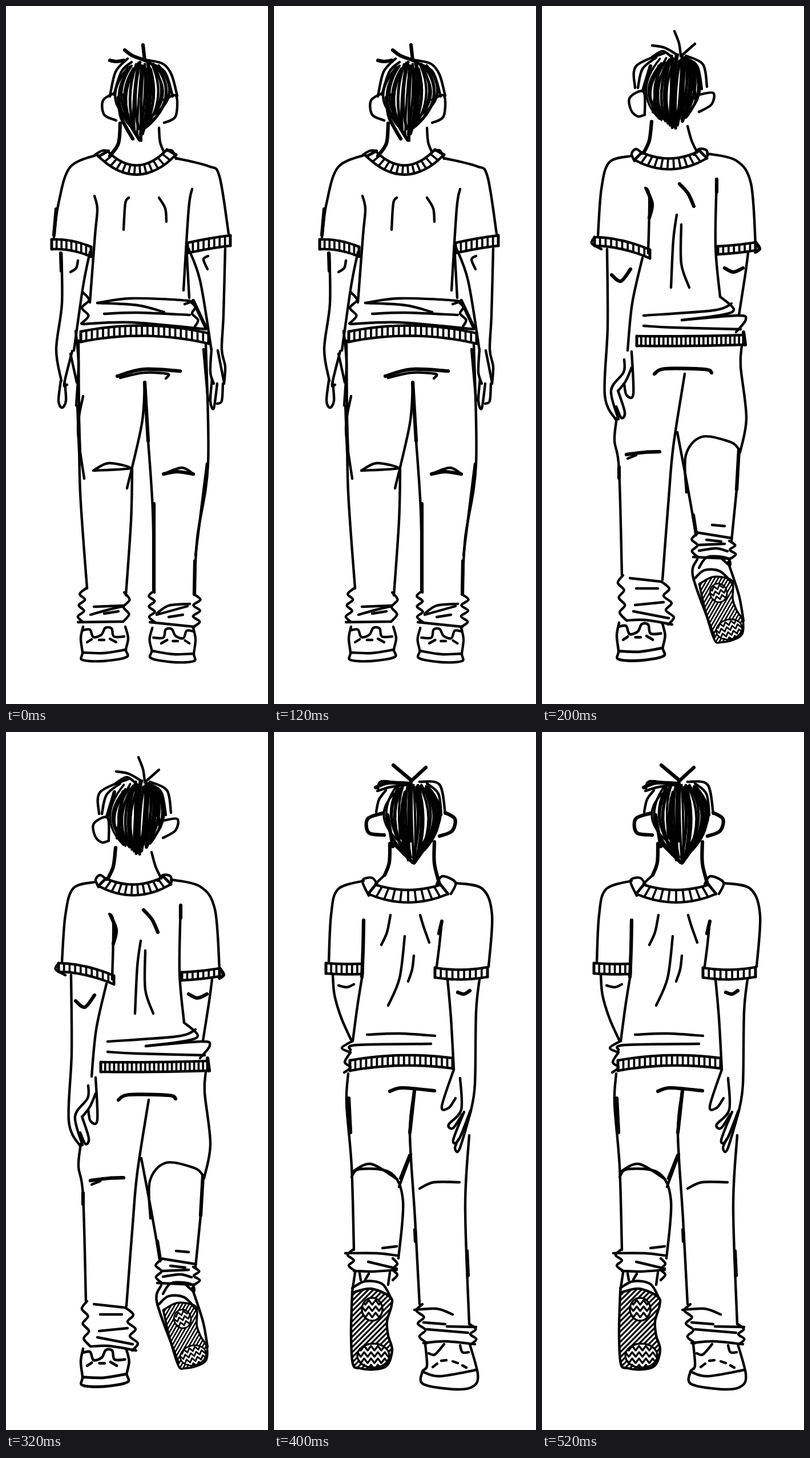
An HTML page with a canvas for the animation above (0.6 s loop, 459 by 1220 pixels).

```html
<!DOCTYPE html>
<html lang="en">
<head>
<meta charset="utf-8">
<title>Walk cycle</title>
<style>
html, body { margin: 0; width: 100%; height: 100%; overflow: hidden; background: #fff; }
canvas { display: block; }
</style>
</head>
<body>
<canvas id="stage" width="459" height="1220"></canvas>
<script>
const ctx = document.getElementById('stage').getContext('2d');
const HOLD = 200, LINE = 4.4, BOLD = 6.2;

const lerp = (a, b, u) => a + (b - a) * u;

function random(seed) {
  return () => (seed = (seed * 16807) % 2147483647) / 2147483647;
}

// Smooth stroke through x, y pairs.
function curve(width, v) {
  const n = v.length / 2;
  const at = i => { const k = 2 * Math.max(0, Math.min(n - 1, i)); return [v[k], v[k + 1]]; };
  ctx.lineWidth = width;
  ctx.beginPath();
  ctx.moveTo(...at(0));
  for (let i = 0; i < n - 1; i++) {
    const a = at(i - 1), b = at(i), c = at(i + 1), d = at(i + 2);
    ctx.bezierCurveTo(
      b[0] + (c[0] - a[0]) / 6, b[1] + (c[1] - a[1]) / 6,
      c[0] - (d[0] - b[0]) / 6, c[1] - (d[1] - b[1]) / 6, c[0], c[1]);
  }
  ctx.stroke();
}
const pen = (...v) => curve(LINE, v);
const bold = (...v) => curve(BOLD, v);

// Wobbling cloth edge with n bumps.
function wave(x0, y0, x1, y1, n, amp) {
  const v = [];
  for (let i = 0; i <= n * 2; i++) {
    const u = i / (n * 2);
    v.push(lerp(x0, x1, u) + (i % 2 ? amp : -amp), lerp(y0, y1, u));
  }
  pen(...v);
}

// Knitted band: two sagging edges joined by n bars.
function rib(x0, y0, x1, y1, sag, depth, n, flare = 0) {
  const edge = (u, k) => [
    lerp(x0 - flare * k, x1 + flare * k, u),
    lerp(y0, y1, u) + depth * k + 4 * u * (1 - u) * (sag + flare * k * 0.45)];
  for (const k of [0, 1]) {
    const v = [];
    for (let i = 0; i <= 8; i++) v.push(...edge(i / 8, k));
    pen(...v);
  }
  for (let i = 0; i <= n; i++)
    curve(i % n ? 3.7 : 5, [...edge(i / n, 0), ...edge(i / n, 1)]);
}

// Strands run from the crown over the widest part to a pointed nape.
function hair(top, mid, tip, n, seed, rise) {
  const rnd = random(seed);
  for (let i = 0; i < n; i++) {
    const u = (i + 0.2 + rnd() * 0.6) / n, side = Math.abs(2 * u - 1);
    const x0 = lerp(top[0], top[1], u), y0 = top[2] + rnd() * 16 + side * 8;
    const x1 = lerp(mid[0], mid[1], u) + rnd() * 4 - 2;
    const x2 = lerp(tip[0], tip[1], u) + rnd() * 8 - 4;
    const y2 = tip[2] - rise * side - rnd() * 16;
    ctx.lineWidth = 3.6 + rnd() * 2;
    ctx.beginPath();
    ctx.moveTo(x0, y0);
    ctx.quadraticCurveTo(x1 * 2 - (x0 + x2) / 2, mid[2], x2, y2);
    ctx.stroke();
  }
}

function local(x, y, turn, sx, sy, paint) {
  ctx.save();
  ctx.translate(x, y);
  ctx.rotate(turn);
  ctx.scale(sx, sy);
  paint();
  ctx.restore();
}

// Planted shoe seen from behind.
function shoe(x, y, sx, sy) {
  local(x, y, 0, sx, sy, () => {
    pen(4, 0, 0, 20, 3, 45, 3, 58, 40, 60, 80, 53, 79, 40, 83, 20, 78, 0);
    pen(3, 45, 40, 46, 79, 40);
    pen(4, 6, 16, 5, 22, 18, 36, 14, 43, 2, 54, 3, 58, 17, 76, 17);
    pen(11, 27, 19, 22);
    pen(32, 23, 41, 23);
    pen(51, 21, 62, 27);
  });
}

function pad(x, y, rx, ry) {
  ctx.save();
  ctx.beginPath();
  ctx.ellipse(x, y, rx, ry, 0, 0, 7);
  ctx.fill();
  ctx.stroke();
  ctx.clip();
  for (let row = 8 - ry; row < ry; row += 11) {
    ctx.beginPath();
    for (let k = 0; k * 6 < rx * 2 + 6; k++) ctx.lineTo(x - rx + k * 6, y + row + (k % 2 ? 4 : -4));
    ctx.stroke();
  }
  ctx.restore();
}

// Raised shoe showing its hatched sole.
function sole(x, y, turn, sx, sy) {
  local(x, y, turn, sx, sy, () => {
    pen(-33, -64, 0, -71, 33, -57, 36, -42, 28, -14, 30, 11, 37, 36, 28, 63, 5, 70, -20, 68, -32, 60, -35, 6, -33, -64);
    ctx.save();
    ctx.clip();
    ctx.lineWidth = 3.2;
    for (let h = -110; h < 120; h += 9) {
      ctx.beginPath();
      ctx.moveTo(-40, h + 40);
      ctx.lineTo(40, h - 40);
      ctx.stroke();
    }
    ctx.restore();
    ctx.lineWidth = 3.4;
    pad(2, -35, 18, 20);
    pad(4, 46, 28, 21);
  });
}

function standing() {
  hair([214, 268, 92], [191, 286, 160], [216, 252, 236], 20, 11, 28);
  bold(197, 160, 202, 195, 222, 232);
  bold(207, 155, 212, 195, 234, 234);
  bold(238, 105, 236, 150);
  bold(182, 95, 193, 97, 206, 95);
  bold(208, 77, 222, 87, 250, 97);
  bold(240, 68, 243, 95);
  pen(213, 92, 192, 115, 182, 158);
  pen(220, 98, 202, 115, 189, 155);
  pen(250, 95, 275, 101, 290, 120, 300, 157);
  pen(248, 98, 278, 115, 292, 158);
  pen(277, 164, 298, 157, 297, 193, 277, 204);
  pen(190, 152, 170, 165, 172, 190, 193, 200);
  bold(200, 205, 197, 240, 182, 262);
  pen(268, 213, 270, 238, 277, 256);

  rib(178, 254, 282, 251, 26, 9, 13, 16);
  pen(156, 260, 168, 253, 180, 253);
  pen(280, 253, 291, 253, 298, 267);
  pen(160, 260, 112, 282, 92, 345, 84, 404);
  pen(298, 266, 355, 280, 374, 298, 390, 398);
  bold(88, 355, 84, 400);
  pen(155, 332, 160, 355, 156, 400, 147, 518);
  pen(326, 320, 320, 355, 311, 497);
  pen(316, 420, 321, 510);
  pen(215, 335, 209, 345, 206, 391);
  pen(268, 335, 279, 354, 281, 377);
  rib(80, 408, 149, 421, -4, 17, 8);
  rib(318, 414, 393, 401, -1, 18, 8);
  pen(160, 519, 220, 511, 318, 515, 313, 521);
  pen(160, 519, 230, 523, 277, 535);
  pen(172, 538, 230, 536, 322, 540);
  pen(134, 556, 220, 553, 350, 565);
  wave(140, 500, 138, 555, 2, 6);
  wave(325, 515, 335, 560, 2, 4);
  bold(328, 515, 350, 562);
  rib(131, 569, 355, 572, -12, 18, 23);

  pen(97, 432, 98, 520, 88, 600, 97, 655);
  pen(147, 430, 135, 490, 119, 602);
  pen(96, 655, 92, 690, 98, 702, 105, 690, 103, 658);
  pen(116, 603, 102, 660, 107, 662);
  pen(113, 608, 124, 658);
  pen(122, 568, 127, 625, 123, 698);
  pen(126, 445, 123, 458, 113, 465);
  bold(96, 432, 97, 463);
  pen(384, 424, 381, 540, 378, 600, 384, 630, 382, 660);
  pen(318, 420, 340, 480, 360, 602);
  pen(354, 437, 346, 443, 353, 460);
  pen(360, 600, 358, 640, 364, 660);
  pen(371, 602, 382, 658);
  pen(361, 652, 358, 690, 364, 703, 370, 660);
  pen(380, 660, 378, 690, 370, 695);
  pen(346, 600, 354, 690);

  pen(127, 585, 128, 720, 130, 850, 142, 1018);
  pen(135, 682, 126, 740, 137, 826);
  pen(350, 590, 354, 800, 335, 930, 330, 1028);
  pen(352, 800, 332, 960);
  bold(195, 647, 240, 635, 305, 638);
  pen(200, 650, 240, 641, 283, 643, 280, 651);
  pen(243, 657, 238, 730, 212, 843);
  bold(243, 658, 249, 760);
  pen(249, 760, 257, 880, 260, 1025);
  pen(221, 810, 219, 900, 210, 1030);
  pen(153, 812, 180, 799, 217, 808, 153, 812);
  bold(276, 818, 300, 814, 328, 818);
  pen(276, 818, 308, 807, 328, 818);
  bold(259, 870, 259, 1020);
  bold(126, 700, 129, 780);
  bold(331, 970, 330, 1028);

  wave(135, 1018, 130, 1077, 3, -5);
  wave(212, 1025, 210, 1076, 2, 5);
  wave(255, 1022, 256, 1077, 3, -5);
  wave(335, 1028, 333, 1086, 3, 6);
  pen(126, 1077, 205, 1076);
  pen(252, 1077, 330, 1085);
  pen(154, 1050, 206, 1048);
  pen(148, 1064, 180, 1055, 206, 1049);
  pen(172, 1062, 197, 1058);
  pen(264, 1062, 285, 1048, 322, 1045);
  pen(264, 1064, 318, 1049);
  pen(285, 1068, 310, 1064);
  shoe(131, 1085, 1, 1);
  shoe(332, 1087, -0.97, 1);
}

function leftStep() {
  hair([206, 268, 84], [182, 278, 150], [204, 252, 222], 24, 23, 22);
  bold(190, 105, 177, 148);
  bold(205, 105, 195, 185);
  bold(228, 95, 226, 205);
  bold(244, 95, 248, 190);
  bold(258, 105, 270, 165);
  pen(193, 69, 215, 73, 238, 86);
  pen(232, 44, 240, 65, 243, 86);
  pen(268, 66, 243, 88);
  pen(215, 82, 165, 105, 163, 143);
  pen(200, 90, 176, 110, 168, 143);
  pen(230, 92, 212, 79, 193, 89);
  pen(252, 87, 282, 102, 289, 141);
  pen(250, 90, 272, 105, 280, 145);
  pen(180, 190, 168, 193, 156, 182, 154, 160, 178, 150, 180, 190);
  pen(275, 155, 300, 152, 297, 172, 275, 185);
  bold(192, 202, 188, 235, 178, 257);
  pen(255, 210, 262, 235, 272, 256);

  rib(175, 256, 276, 253, 12, 13, 11, 13);
  pen(176, 258, 165, 250, 157, 258, 162, 271);
  pen(266, 260, 275, 250, 288, 252, 290, 262);
  pen(157, 262, 118, 273, 104, 320, 98, 402);
  pen(289, 258, 340, 270, 366, 310, 374, 415);
  pen(181, 318, 188, 335, 186, 432);
  bold(183, 320, 193, 346, 188, 370);
  pen(306, 302, 304, 420, 312, 508);
  bold(306, 303, 306, 325);
  bold(241, 311, 256, 328, 266, 350);
  pen(236, 365, 230, 410, 226, 492);
  pen(244, 382, 244, 450, 258, 492);
  rib(92, 404, 189, 426, -5, 15, 10);
  rib(308, 420, 374, 413, 1, 14, 7);
  pen(92, 404, 87, 415, 104, 425);
  bold(374, 413, 381, 424, 374, 430);
  pen(312, 508, 336, 530, 315, 540, 245, 549);
  pen(178, 541, 300, 532, 332, 520);
  pen(245, 549, 342, 541, 357, 548, 340, 570);
  pen(178, 559, 230, 562, 348, 565);
  rib(166, 577, 353, 575, 1, 17, 24);
  bold(353, 570, 356, 592);

  pen(114, 425, 115, 560, 110, 680, 130, 724);
  pen(176, 440, 158, 520, 150, 602);
  pen(157, 604, 160, 678, 148, 680, 144, 660);
  pen(144, 618, 143, 640, 121, 672, 134, 722);
  pen(133, 672, 145, 710, 139, 720, 130, 700);
  pen(157, 632, 147, 655, 134, 672);
  pen(361, 432, 356, 470, 345, 540);
  bold(122, 470, 138, 481, 155, 460);
  bold(320, 458, 335, 465, 352, 458);

  pen(350, 594, 348, 630, 358, 720, 347, 780);
  pen(250, 643, 230, 770, 222, 860, 211, 1003);
  pen(131, 720, 127, 760, 135, 810, 140, 995);
  pen(237, 745, 255, 840, 270, 925);
  pen(253, 850, 252, 785, 280, 753, 330, 762, 345, 775);
  pen(341, 845, 332, 935);
  bold(197, 643, 215, 634, 285, 635, 297, 641);
  bold(345, 775, 341, 845);
  bold(148, 784, 180, 780, 206, 779);
  pen(150, 791, 165, 785);
  bold(135, 806, 135, 825);
  bold(265, 890, 270, 922);

  wave(137, 995, 142, 1073, 3, -5);
  wave(215, 1006, 227, 1081, 3, 6);
  pen(148, 1074, 180, 1073, 228, 1081);
  pen(154, 1000, 208, 1006);
  pen(165, 1018, 203, 1018);
  pen(163, 1047, 213, 1042);
  pen(160, 1058, 222, 1070);
  wave(267, 922, 268, 963, 2, -5);
  wave(333, 935, 335, 966, 2, 5);
  pen(265, 963, 330, 966);
  pen(270, 920, 332, 930);
  pen(298, 907, 320, 909);
  pen(275, 942, 320, 940);
  pen(288, 933, 314, 936);
  pen(275, 952, 305, 948, 325, 953);
  shoe(131, 1078, 1.02, 1.1);
  pen(272, 967, 264, 995, 290, 1070, 302, 1102);
  pen(275, 982, 290, 963, 324, 965, 329, 978, 314, 965);
  pen(326, 972, 345, 1030, 353, 1075);
  pen(268, 1000, 285, 986, 312, 988, 334, 1010);
  sole(315, 1054, -0.26, 0.82, 0.82);
}

function rightStep() {
  hair([210, 272, 86], [190, 296, 150], [222, 264, 238], 21, 37, 30);
  bold(199, 145, 208, 200);
  bold(220, 150, 222, 185);
  bold(240, 92, 240, 190);
  bold(284, 145, 278, 180, 246, 228);
  bold(210, 195, 243, 228);
  bold(209, 58, 240, 84);
  bold(266, 62, 240, 86);
  bold(178, 97, 200, 89, 240, 90);
  pen(181, 103, 205, 96, 235, 92);
  pen(182, 99, 190, 86, 238, 92);
  pen(255, 87, 290, 92, 300, 143);
  pen(196, 102, 184, 118, 179, 140);
  pen(268, 90, 288, 108, 293, 145);
  bold(190, 142, 164, 152, 166, 176, 193, 180);
  bold(300, 141, 317, 152, 312, 173, 290, 182);
  bold(203, 195, 202, 228, 194, 250);
  bold(281, 192, 281, 230, 290, 266);
  pen(194, 250, 178, 265);

  rib(178, 267, 292, 267, 9, 16, 10, 13);
  pen(182, 268, 172, 255, 155, 260, 166, 286);
  pen(285, 266, 295, 252, 318, 263, 310, 283);
  pen(157, 260, 112, 275, 100, 320, 96, 402);
  pen(318, 264, 365, 274, 382, 320, 376, 410);
  bold(157, 329, 156, 380, 154, 428);
  pen(154, 430, 146, 480, 138, 540);
  pen(294, 330, 290, 370, 285, 410);
  bold(294, 331, 289, 352);
  pen(204, 320, 198, 350, 188, 372);
  pen(229, 357, 220, 430, 200, 478);
  pen(245, 391, 242, 415, 235, 436);
  pen(256, 320, 262, 340, 272, 368);
  rib(91, 404, 155, 405, 1, 18, 7);
  rib(282, 412, 374, 411, 4, 17, 9);
  pen(163, 529, 220, 527, 282, 531);
  pen(134, 556, 145, 547, 275, 545);
  pen(138, 540, 119, 552, 134, 560);
  pen(134, 560, 124, 577, 134, 586, 123, 595);
  rib(133, 574, 313, 570, -7, 18, 19);

  pen(103, 425, 106, 460, 118, 500, 135, 538);
  pen(113, 443, 128, 446, 140, 441);
  pen(304, 432, 310, 500, 315, 590);
  pen(360, 432, 354, 490, 352, 615, 345, 662);
  bold(322, 455, 333, 458, 343, 452);
  pen(315, 590, 294, 654, 306, 657, 318, 640);
  pen(326, 605, 328, 660, 306, 686, 314, 692, 330, 668);
  pen(333, 664, 314, 713, 324, 712, 344, 662);
  pen(323, 712, 317, 727, 325, 729, 345, 662);

  pen(130, 597, 127, 650, 136, 760, 140, 905);
  pen(246, 625, 238, 700, 247, 850, 255, 1000);
  pen(240, 738, 219, 795);
  pen(136, 778, 150, 764, 205, 771, 226, 820, 218, 920);
  pen(138, 768, 170, 755, 216, 782);
  pen(342, 705, 335, 830, 342, 1035);
  pen(255, 798, 280, 787, 325, 787);
  bold(203, 628, 225, 622, 281, 627);
  bold(246, 627, 238, 700);
  bold(131, 640, 134, 700);
  bold(238, 740, 222, 780);
  bold(247, 870, 248, 890);
  bold(338, 907, 340, 950);

  wave(133, 905, 137, 942, 2, -5);
  wave(212, 920, 212, 958, 2, 4);
  pen(140, 942, 175, 943, 215, 940);
  pen(125, 911, 180, 911, 215, 915);
  pen(190, 902, 215, 899);
  pen(165, 926, 215, 938);
  wave(254, 1000, 262, 1068, 3, -6);
  wave(348, 1035, 350, 1070, 2, 5);
  pen(262, 1068, 300, 1065, 352, 1070);
  pen(246, 1010, 285, 1008, 313, 1018);
  pen(268, 1044, 340, 1050);
  pen(262, 1032, 300, 1035);
  pen(303, 1039, 354, 1040);
  pen(142, 945, 137, 978);
  pen(203, 945, 200, 966);
  pen(137, 972, 160, 960, 190, 965, 205, 990);
  pen(150, 946, 152, 958);
  pen(160, 957, 166, 947);
  sole(170, 1044, 0, 1, 1);
  pen(265, 1070, 268, 1108, 260, 1118, 262, 1140, 320, 1149, 350, 1143, 357, 1122, 343, 1070);
  pen(260, 1118, 290, 1126, 354, 1115);
  pen(271, 1086, 282, 1088, 298, 1070);
  pen(326, 1072, 330, 1084, 341, 1084);
  pen(278, 1110, 286, 1104);
  pen(293, 1099, 302, 1098);
  pen(313, 1100, 322, 1103);
  pen(330, 1107, 337, 1111);
}

const poses = [standing, leftStep, rightStep];
let shown = -1, start;

function draw(now) {
  const i = Math.floor(now / HOLD) % poses.length;
  if (i === shown) return;
  shown = i;
  ctx.fillStyle = '#fff';
  ctx.fillRect(0, 0, 459, 1220);
  ctx.strokeStyle = '#000';
  ctx.lineCap = ctx.lineJoin = 'round';
  poses[i]();
}

function tick(now) {
  start ??= now;
  draw(now - start);
  requestAnimationFrame(tick);
}
draw(0);
requestAnimationFrame(tick);
</script>
</body>
</html>
```
